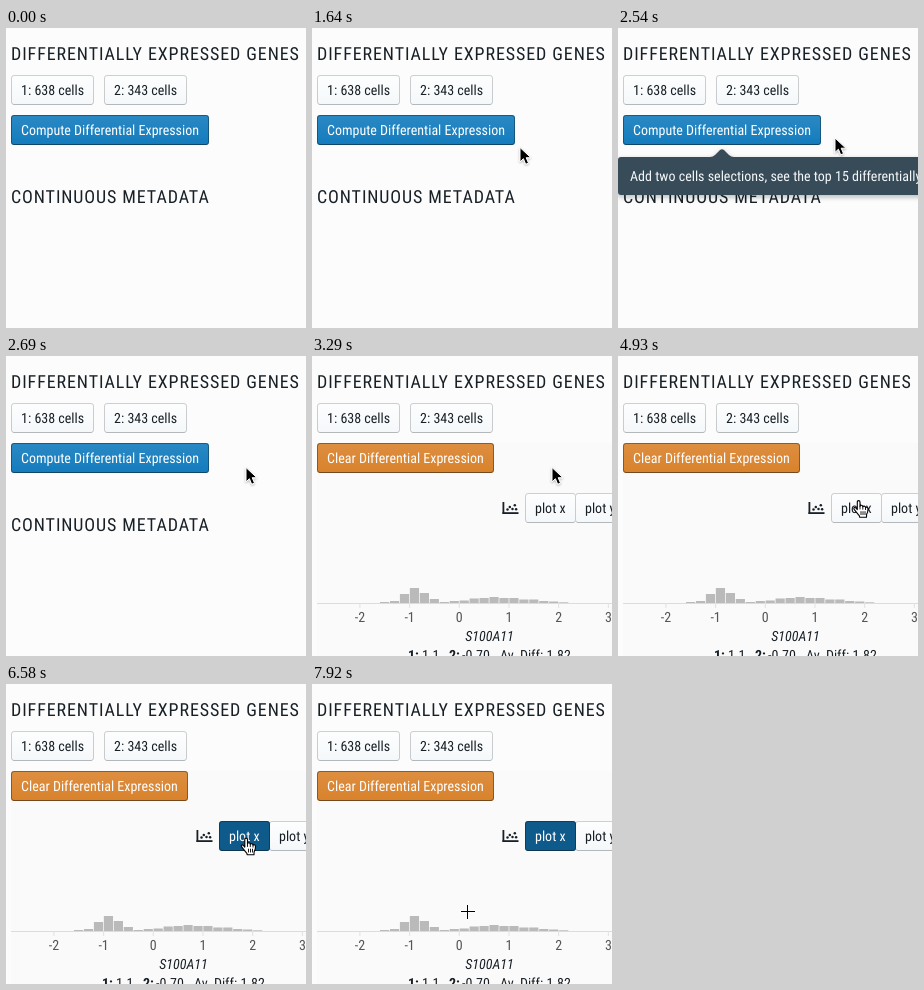
These frames come from a looping animation (300 px wide and 300 px high, 8 s). An HTML page:

```html
<!DOCTYPE html>
<html lang="en">
<head>
<meta charset="utf-8">
<title>Differential expression panel</title>
<style>
  html, body { margin: 0; width: 100%; height: 100%; overflow: hidden; background: #fcfcfc; }
  svg { display: block; width: 100vw; height: 100vh; }
  text {
    font: 400 14px "Roboto Condensed", Roboto, "Liberation Sans", sans-serif;
    font-stretch: 75%;
    text-rendering: geometricPrecision;
    fill: #182026;
    white-space: pre;
  }
  .title { font-size: 18px; letter-spacing: .05em; }
  .light { fill: #fff; }
  .tip { fill: #f5f8fa; }
  .axis { fill: #555; text-anchor: middle; }
  .gene { font-style: italic; text-anchor: middle; }
  .bold { font-weight: 700; }
</style>
</head>
<body>
<svg id="stage" viewBox="0 0 300 300">
  <defs>
    <linearGradient id="pale" x2="0" y2="1">
      <stop stop-color="#fff" stop-opacity=".8"/>
      <stop offset="1" stop-color="#fff" stop-opacity="0"/>
    </linearGradient>
    <linearGradient id="sheen" x2="0" y2="1">
      <stop stop-color="#fff" stop-opacity=".1"/>
      <stop offset="1" stop-color="#fff" stop-opacity="0"/>
    </linearGradient>
    <filter id="soft" x="-20%" y="-60%" width="140%" height="240%">
      <feDropShadow dx="0" dy="2" stdDeviation="2.5" flood-color="#10161a" flood-opacity=".3"/>
    </filter>
    <filter id="drop" x="-40%" y="-40%" width="200%" height="200%">
      <feDropShadow dx="0" dy="1" stdDeviation=".8" flood-opacity=".3"/>
    </filter>
  </defs>
</svg>
<script>
const stage = document.getElementById('stage');
const LOOP = 8000;

const label = (x, y, str, cls = '') => `<text x="${x}" y="${y}" class="${cls}">${str}</text>`;
const group = (id, body) => `<g id="${id}">${body}</g>`;
const rect = (x, y, w, h, fill, extra = '') =>
  `<rect x="${x}" y="${y}" width="${w}" height="${h}" fill="${fill}" ${extra}/>`;

// the bottom edge carries a second, lighter line over the border
function button(x, y, w, color, gloss, edge) {
  return rect(x, y, w, 30, color, 'rx="3"') +
    (gloss ? rect(x, y, w, 30, `url(#${gloss})`, 'rx="3"') : '') +
    rect(x + 2, y + 29, w - 4, 1, '#10161a', `opacity="${edge / 2}"`) +
    rect(x + .5, y + .5, w - 1, 29, 'none', `rx="2.5" stroke="#10161a" stroke-opacity="${edge}"`);
}

function scatterIcon(x, y) {
  const dots = [[5, 8.5], [7.3, 6], [10, 8], [12.3, 4.2], [13.6, 8.3]];
  return `<g transform="translate(${x} ${y})" fill="#182026">` +
    rect(0, 1, 1.8, 12, '#182026') + rect(0, 11.2, 16, 1.8, '#182026') +
    dots.map(([cx, cy]) => `<circle cx="${cx}" cy="${cy}" r="1.25"/>`).join('') + '</g>';
}

function histogram() {
  const heights = [1, 2, 9, 15, 10, 4, 1, 2, 2.5, 4.5, 5, 6, 5, 5, 3.5, 3.5, 2, 1.5, .7];
  const bars = heights.map((h, i) => rect(68 + i * 9.95, 247 - h, 9.2, h, '#bababa')).join('');
  const ticks = [-2, -1, 0, 1, 2, 3].map(v => {
    const x = 147.3 + v * 49.7;
    return rect(x - .5, 247, 1, 5, '#e2e2e2') + label(x, 266, v, 'axis');
  }).join('');
  return bars + rect(5, 247, 295, 1, '#dcdcdc') + ticks;
}

const arrow = `<path d="M0 0V14.4L3.4 11.2L5.700 16.8L8.5 15.6L6.200 10.2H10.9Z"
  fill="#000" stroke="#fff" stroke-width="1" stroke-linejoin="round" filter="url(#drop)"/>`;

const hand = `<g fill="#fff" stroke="#000" stroke-width="1.1" stroke-linejoin="round" stroke-linecap="round">
  <path d="M4.3 9.6V2Q4.3 .6 5.6 .6Q7 .6 7 2V6.3Q7.2 5.3 8.4 5.3Q9.7 5.3 9.8 6.8Q10.2 6 11.3 6.1
  Q12.5 6.3 12.5 7.6Q13 7 13.8 7.2Q15 7.5 15 9Q15 12.5 13.6 14.4L13.5 17.2H6.6L6.4 15.8
  Q4.5 13.6 2.9 11.6L1 9.2Q.4 8 1.4 7.4Q2.6 7 4.3 9.6Z"/>
  <path d="M7 6.3V9M9.8 6.8V9.2M12.5 7.6V9.6M8 11.6V14.6M10 11.6V14.6M12 11.6V14.6" stroke-width=".9"/></g>`;

const cross = `<path d="M6.5 0V14M0 6.5H14" stroke="#fff" stroke-width="2.4" opacity=".6"/>
  <path d="M6.5 0V14M0 6.5H14" stroke="#000"/>`;

stage.insertAdjacentHTML('beforeend',
  label(5, 32, 'DIFFERENTIALLY EXPRESSED GENES', 'title') +
  button(5, 47, 83, '#f5f8fa', 'pale', .2) + label(15, 67, '1: 638 cells') +
  button(98, 47, 83, '#f5f8fa', 'pale', .2) + label(108, 67, '2: 343 cells') +
  group('before',
    group('rest', button(5, 87, 198, '#137cbd', 'sheen', .4)) +
    group('hover', button(5, 87, 198, '#106ba3', 'sheen', .4)) +
    label(15, 107, 'Compute Differential Expression', 'light') +
    label(5, 175, 'CONTINUOUS METADATA', 'title')) +
  group('tooltip',
    '<path d="M3 129H92Q95 129 97 127L102 122Q104 120.4 106 122L111 127Q113 129 116 129H330V167H3Q0 167 0 164V132Q0 129 3 129Z" fill="#394b59" filter="url(#soft)"/>' +
    label(12, 153, 'Add two cells selections, see the top 15 differentially expressed genes', 'tip')) +
  group('after',
    rect(5, 87, 295, 213, '#fafafa') +
    button(5, 87, 177, '#d9822b', 'sheen', .4) +
    label(15, 107, 'Clear Differential Expression', 'light') +
    scatterIcon(190.5, 145) +
    button(263, 137, 52, '#f5f8fa', 'pale', .2) + label(273, 157, 'plot y') +
    group('idle', button(213, 137, 51, '#f5f8fa', 'pale', .2) + label(223, 157, 'plot x')) +
    group('press', button(213, 137, 51, '#d8e1e8', '', .2) + label(223, 157, 'plot x')) +
    group('on', button(213, 137, 51, '#0e5a8a', '', .4) + label(223, 157, 'plot x', 'light')) +
    histogram() +
    label(177.5, 285, 'S100A11', 'gene') +
    label(96, 304, '1:', 'bold') + label(110, 304, '1.1') +
    label(137, 304, '2:', 'bold') + label(150, 304, '-0.70') +
    label(188, 304, 'Av. Diff: 1.82')) +
  group('arrow', arrow) + group('hand', hand) + group('cross', cross));

// [time, cursor, x, y]
const moves = [
  [0, ''],
  [900, 'arrow', 299, 117], [1050, 'arrow', 237, 128], [1200, 'arrow', 236, 127.5],
  [1490, 'arrow', 214, 120], [1640, 'arrow', 208, 119.5],
  [1790, 'hand', 175, 111], [1940, 'hand', 174, 109],
  [2540, 'arrow', 217, 110], [2690, 'arrow', 240, 111.5],
  [4930, 'hand', 235, 144], [5080, 'hand', 233, 154],
  [6580, 'hand', 234.5, 153.5], [6730, 'hand', 243, 154], [6880, ''],
  [7770, 'cross', 208, 237], [7920, 'cross', 149, 221]
];

// times at which each part turns on, off, on again...
const spans = {
  before: [0, 3290], rest: [0, 1790, 2540, 3290], hover: [1790, 2540],
  tooltip: [1940, 2690], after: [3290, LOOP],
  idle: [3290, 5530], press: [5530, 5680], on: [5680, LOOP]
};

const part = id => document.getElementById(id);
const show = (id, yes) => part(id).setAttribute('visibility', yes ? 'visible' : 'hidden');

function draw(t) {
  for (const [id, edges] of Object.entries(spans)) {
    show(id, edges.filter(e => e <= t).length % 2 === 1);
  }
  const [, kind, x, y] = moves.filter(m => m[0] <= t).pop();
  for (const id of ['arrow', 'hand', 'cross']) show(id, id === kind);
  if (kind) part(kind).setAttribute('transform', `translate(${x} ${y})`);
}

const start = performance.now();
function frame() {
  draw((performance.now() - start) % LOOP);
  requestAnimationFrame(frame);
}
frame();
</script>
</body>
</html>
```
